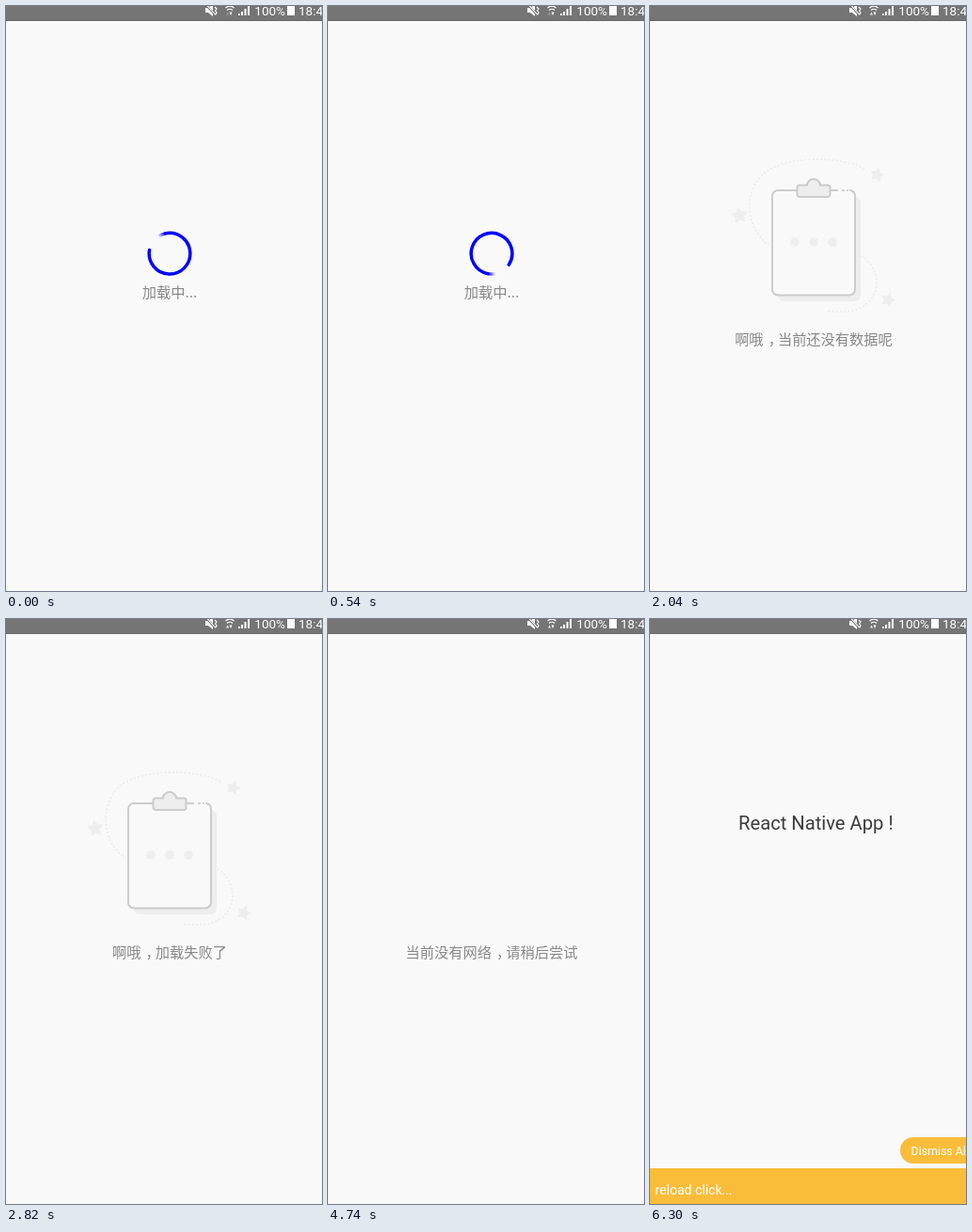
An HTML page that plays this animation: 336 px wide and 622 px high, repeating every 7.5 s.

```html
<!DOCTYPE html>
<html lang="zh-CN">
<head>
<meta charset="utf-8">
<title>Loading states</title>
<style>
  html, body { margin: 0; width: 100%; height: 100%; overflow: hidden; background: #f9f9f9; }
  svg { display: block; width: 100vw; height: 100vh; }
  text { font-family: Roboto, "Noto Sans CJK SC", "Noto Sans CJK", sans-serif; }
  .msg { font: 15.25px "Noto Sans CJK SC", "Noto Sans CJK", sans-serif; fill: #888; text-anchor: middle; }
  .line { fill: none; stroke: #ccc; stroke-width: 2; stroke-linecap: round; stroke-linejoin: round; }
  .dots { fill: none; stroke: #ededed; stroke-width: 1.8; stroke-dasharray: 2 2.2; }
  .pale { fill: #eee; }
  .paper { fill: #f9f9f9; }
  .star { fill: #eee; stroke: #eee; stroke-width: 1.5; stroke-linejoin: round; }
</style>
</head>
<body>
<svg viewBox="0 0 336 622">
  <defs>
    <linearGradient id="fade" gradientUnits="userSpaceOnUse" x1="0" y1="0" x2="0" y2="8">
      <stop stop-color="#00f" stop-opacity="0"/>
      <stop offset="1" stop-color="#00f"/>
    </linearGradient>
  </defs>
  <rect width="336" height="622" fill="#f9f9f9"/>

  <!-- status bar -->
  <rect width="336" height="15" fill="#757575"/>
  <rect y="15" width="336" height="1" fill="#696969"/>
  <g fill="#fff">
    <path d="M212 2h3l5-4v13l-5-4h-3z"/>
    <path d="M213 -1l10 11" stroke="#757575" stroke-width="2.4"/>
    <path d="M213.500 -1l9.500 10.500M222 1l2 2-1.500 2 1.500 2-1 2" fill="none" stroke="#fff" stroke-width="1.1"/>
    <path d="M233.500 2q4.500-4 9 0M235 4.500q3-2.500 6 0" fill="none" stroke="#fff" stroke-width="1.2"/>
    <path d="M237.500 6.500h3l-1.500 3.500z"/>
    <path id="arrow" d="M234 9.500h3l-1.500-3z"/>
    <path d="M247 8h2v2h-2zM250 6h2v4h-2zM253.500 3h2v7h-2zM257 0h2v10h-2z"/>
    <rect x="299" width="8" height="10"/>
    <text x="264.300" y="9.800" font-size="13.500">100%</text>
    <text x="311" y="9.800" font-size="13.500">18:4</text>
  </g>

  <g id="loading">
    <g id="spin" fill="none" stroke-width="3.500">
      <path id="tail" stroke="url(#fade)"/>
      <path id="ring" stroke="#00f" stroke-linecap="round"/>
    </g>
    <text class="msg" x="174" y="310">加载中...</text>
  </g>

  <g id="board">
    <path class="dots" d="M228 173C205 160 148 158 122 177C99 195 101 238 127 254M221 264C239 271 246 294 237 309C228 325 207 327 187 324"/>
    <rect class="pale" x="136" y="203" width="88" height="111" rx="6"/>
    <rect class="paper" x="130" y="196" width="88" height="111.500" rx="6"/>
    <path class="line" d="M199 196H136a6 6 0 0 0-6 6V301.500a6 6 0 0 0 6 6H212a6 6 0 0 0 6-6V202q0-5-5-6M205 196h1M210 196h.1"/>
    <path class="line" style="fill:#eee" d="M159 190.500h8a7 6.500 0 0 1 14 0h8a2.500 2.500 0 0 1 2.500 2.500v7.500a2.500 2.500 0 0 1-2.500 2.500H159a2.500 2.500 0 0 1-2.500-2.500V193a2.500 2.500 0 0 1 2.500-2.500z"/>
    <g class="pale"><circle cx="154" cy="251" r="4.800"/><circle cx="174" cy="251" r="4.800"/><circle cx="194" cy="251" r="4.800"/></g>
  </g>

  <g id="ufo">
    <path class="dots" d="M134 222C100 219 77 234 78 252C79 270 95 280 118 282M236 192C253 194 263 203 262 212C260 221 246 226 228 226M240 272Q252 275 258 285"/>
    <ellipse class="pale" cx="174" cy="313" rx="51.500" ry="13"/>
    <path class="line" d="M155 171.500Q175 153 195 171.500M164 181Q175 171 186 181M175 190V207"/>
    <circle cx="175" cy="189" r="3" fill="#ccc"/>
    <ellipse class="line" cx="175" cy="253" rx="69" ry="31.500" style="fill:#f9f9f9"/>
    <path class="dots" d="M110 254C118 270 145 278 175 278S232 270 240 254" style="stroke:#d4d4d4;stroke-width:1.200"/>
    <path class="line" style="fill:#f9f9f9" d="M132 238C134 219 153 208 175 208S217 219 219 238V243C219 252 200 258 175.500 258S132 252 132 243Z"/>
    <path class="line" style="stroke-width:1.500" d="M132 237C134 246 152 251 175.500 251S217 246 219 237"/>
    <path d="M194 210.500L206 216" stroke="#f9f9f9" stroke-width="4"/>
    <path class="line" d="M195.500 211h.1M200 213.200h.1"/>
    <g class="pale"><circle cx="145" cy="234" r="4.500"/><circle cx="165.500" cy="240" r="4.500"/><circle cx="184" cy="240" r="4.500"/><circle cx="204" cy="234" r="4.500"/></g>
  </g>

  <text class="msg" id="msg" x="174" y="360"></text>

  <g id="app">
    <text x="94" y="224" font-size="20.200" fill="#3c3c3c">React Native App !</text>
    <g fill="#fabd3a">
      <rect x="266" y="551" width="90" height="28" rx="14"/>
      <rect y="584" width="336" height="38"/>
    </g>
    <g fill="#fff">
      <text x="277.500" y="569.500" font-size="12.400">Dismiss All</text>
      <text x="5.500" y="612" font-size="14">reload click...</text>
    </g>
  </g>
</svg>
<script>
const $ = id => document.getElementById(id);
const clamp = v => Math.max(0, Math.min(1, v));
const show = (id, on) => $(id).style.display = on ? "" : "none";

function arc(from, to, r) {
  const at = deg => [r * Math.cos(deg * Math.PI / 180), r * Math.sin(deg * Math.PI / 180)];
  return `M${at(from)}A${r} ${r} 0 ${to - from > 180 ? 1 : 0} 1 ${at(to)}`;
}

function star(parent, x, y, r, turn) {
  const points = Array.from({ length: 10 }, (_, i) => {
    const a = (i * 36 - 90 + turn) * Math.PI / 180, d = i % 2 ? r * 0.5 : r;
    return [x + d * Math.cos(a), y + d * Math.sin(a)];
  });
  const shape = document.createElementNS("http://www.w3.org/2000/svg", "polygon");
  shape.setAttribute("class", "star");
  shape.setAttribute("points", points.join(" "));
  $(parent).append(shape);
}

$("tail").setAttribute("d", arc(0, 22, 21.8));
$("ring").setAttribute("d", arc(22, 314, 21.8));
star("board", 95, 222.5, 8, -8);
star("board", 241.5, 179.5, 6.8, 15);
star("board", 253, 312.5, 6.8, 20);
star("ufo", 95, 206.5, 8, -8);
star("ufo", 227, 185, 6.8, 15);
star("ufo", 263, 292.5, 6.2, 20);

let shown = "";
function say(words) {
  if (words === shown) return;
  shown = words;
  // the comma sits in the middle of its cell
  $("msg").innerHTML = words.replace(/，(.)/, '<tspan dx="5">，</tspan><tspan dx="-5">$1</tspan>');
}

function draw(t) {
  // poses are held for 120 and 60 ms in turn
  const pose = t - t % 180 + (t % 180 >= 120 ? 120 : 0);

  show("loading", t < 840);
  $("spin").setAttribute("transform", `translate(174 263.2) rotate(${236 + pose * 0.376})`);

  show("board", t >= 840 && t < 4740);
  $("board").style.opacity = clamp((pose - 840) / 360);
  show("ufo", t >= 4740 && t < 6300);
  $("ufo").style.opacity = clamp((pose - 4740) / 240);

  say(t < 840 || t >= 6300 ? "" :
      t < 2820 ? "啊哦，当前还没有数据呢" :
      t < 4740 ? "啊哦，加载失败了" : "当前没有网络，请稍后尝试");

  show("app", t >= 6300);
  $("arrow").style.opacity = t >= 4020 || (t >= 2040 && t < 2880) ? 0.9 : 0.3;
}

const start = performance.now();
function tick() {
  draw((performance.now() - start) % 7500);
  requestAnimationFrame(tick);
}
tick();
</script>
</body>
</html>
```
